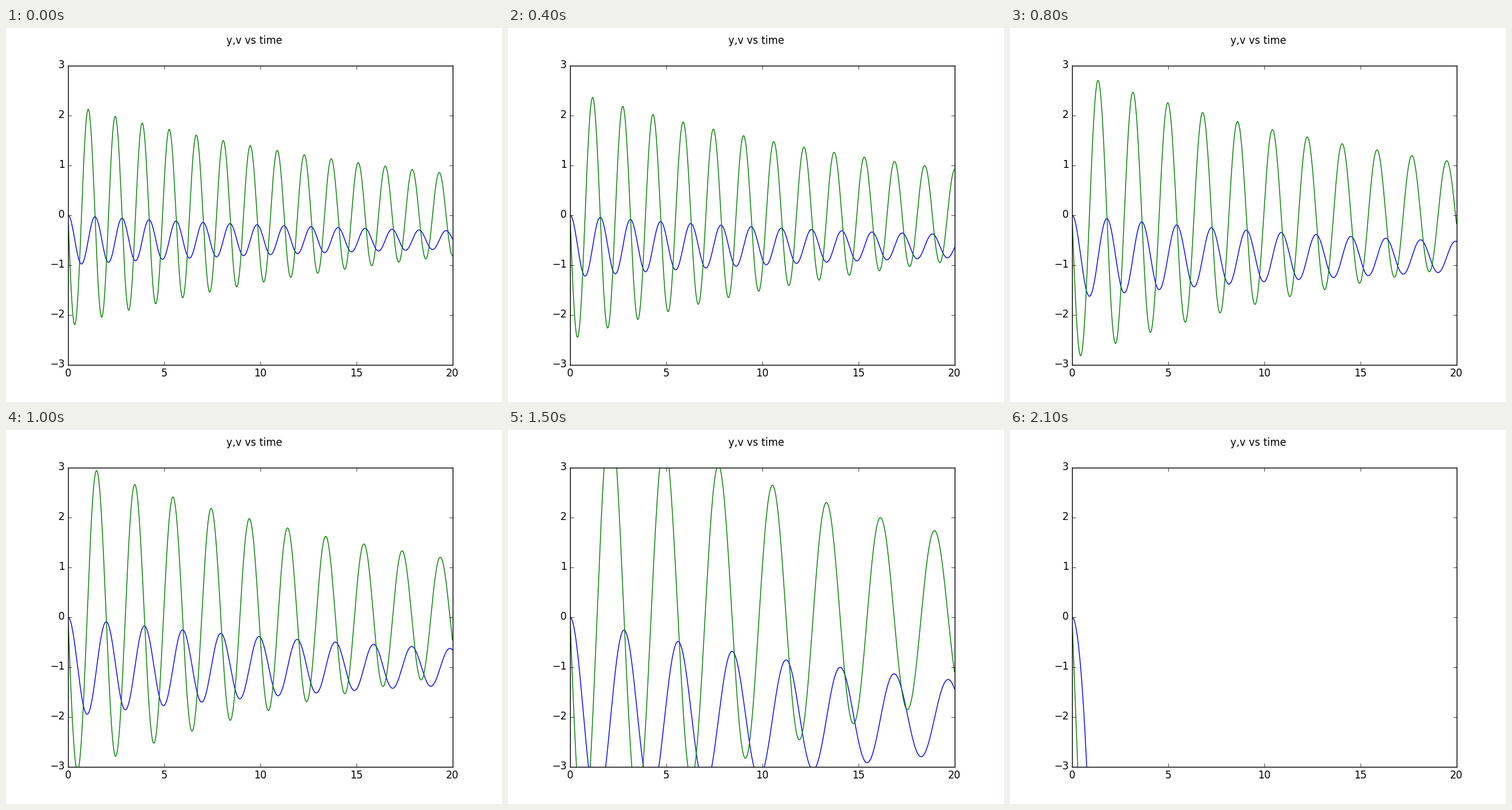
A matplotlib script for the animation above (2.2 s loop, 815 px wide and 615 px high).

```python
import numpy as np
import matplotlib.pyplot as plt
from matplotlib.animation import FuncAnimation

plt.style.use("classic")
plt.rcParams["font.family"] = "DejaVu Sans"

GRAVITY = 10.0
DAMPING = 0.1
K_START = 20
FRAMES = 22

DT = 0.01
t = np.arange(0, 20 + DT / 2, DT)


def motion(k):
    """Height and speed of a damped mass on a spring, released at rest."""
    gamma = DAMPING / 2
    w = np.sqrt(complex(k - gamma**2))  # imaginary once the spring is too weak
    v = -GRAVITY * np.exp(-gamma * t) * (np.sin(w * t) / w).real
    y = np.concatenate(([0], np.cumsum((v[1:] + v[:-1]) * DT / 2)))
    return y, v


fig = plt.figure(figsize=(8.15, 6.15), dpi=100, facecolor="white")
fig.suptitle("y,v vs time")
ax = fig.add_subplot(111)
ax.set_xlim(0, 20)
ax.set_ylim(-3, 3)
y_line, = ax.plot([], [], "b")
v_line, = ax.plot([], [], "g")


def update(i):
    y, v = motion(K_START - i)
    y_line.set_data(t, y)
    v_line.set_data(t, v)
    return y_line, v_line


anim = FuncAnimation(fig, update, frames=FRAMES, interval=100, repeat=True)
plt.show()
```
